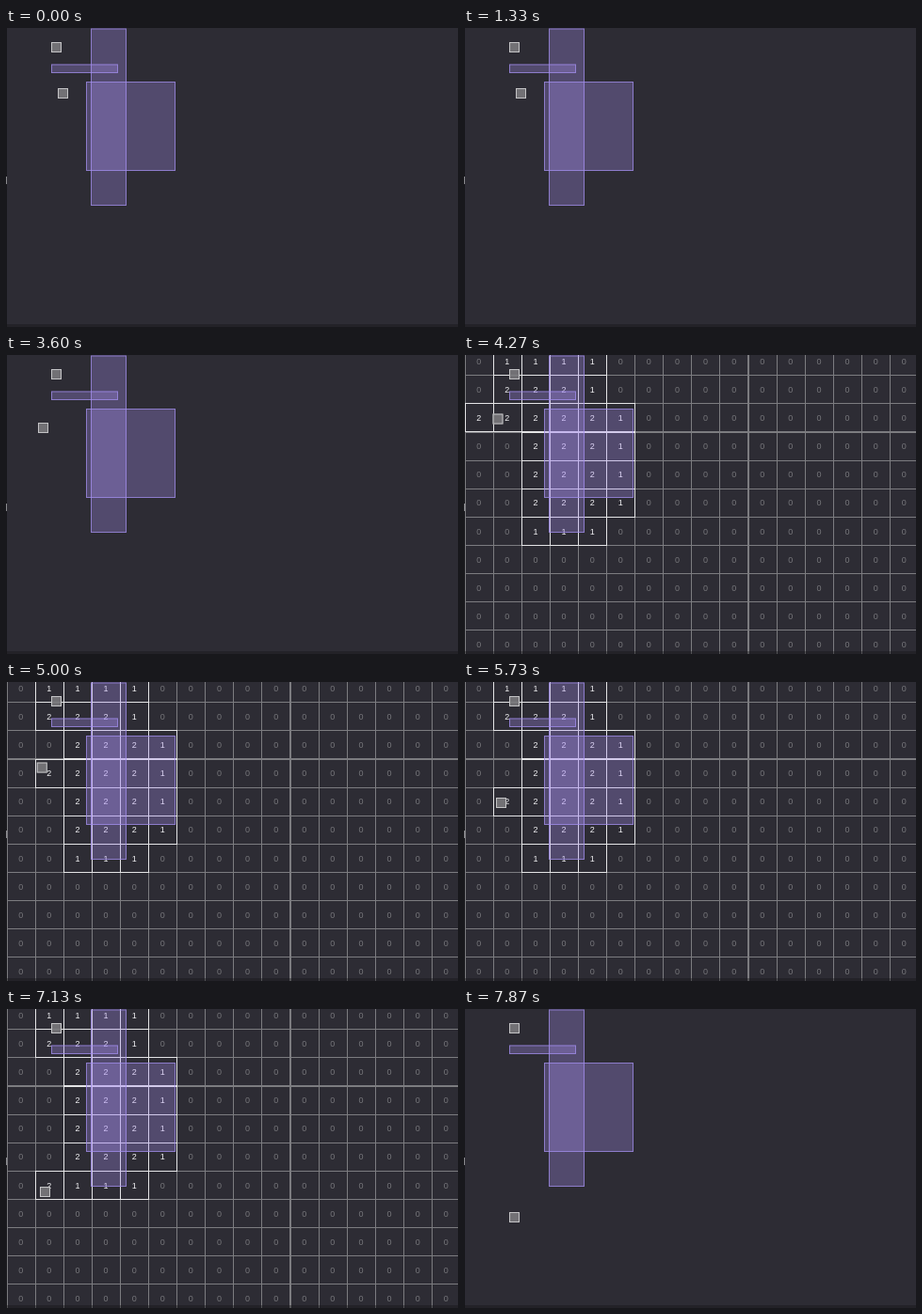
An HTML page with a canvas for the animation above (8000 ms loop, 480 by 318 pixels).

```html
<!DOCTYPE html>
<html lang="en">
<head>
<meta charset="utf-8">
<title>Spatial hash grid</title>
<style>
html, body { margin: 0; width: 100%; height: 100%; overflow: hidden; background: #2d2c34; }
canvas { display: block; }
</style>
</head>
<body>
<canvas id="stage" width="480" height="318"></canvas>
<script>
const ctx = document.getElementById('stage').getContext('2d');
const LOOP = 8000, GRID_ON = 3930, GRID_OFF = 7530;
const CELL = 30.1, LEFT = 1, TOP = -8.3, COLS = 16, ROWS = 11;

const PURPLE = { fill: 'rgba(168,144,240,.3)', stroke: 'rgba(160,140,235,.75)' };
const GRAY = { fill: 'rgba(120,120,123,.92)', stroke: '#c4c4c6' };
const shape = (x, y, w, h, style, weight = 1) => ({ x, y, w, h, style, weight });

const fixed = [
  shape(90, 0.5, 38, 188.5, PURPLE),
  shape(85, 57, 95, 95, PURPLE),
  shape(48, 38.5, 71, 9.5, PURPLE),
  shape(48, 15, 11, 11, GRAY)
];

// Drag path: time, left, top
const path = [
  [2840, 55, 64], [3330, 29.5, 70], [3600, 34, 72], [4270, 30.5, 62.5],
  [4600, 31.5, 67], [5400, 34, 104], [5730, 34, 123], [6050, 29.5, 120],
  [6350, 29, 108], [6700, 31.5, 140], [7130, 36, 189], [7200, 36, 189],
  [7800, 48, 216]
];

function dragged(t) {
  const next = path.findIndex(p => p[0] > t);
  if (next === 0) return path[0].slice(1);
  if (next < 0) return path[path.length - 1].slice(1);
  const a = path[next - 1], b = path[next];
  const k = (t - a[0]) / (b[0] - a[0]);
  return [a[1] + (b[1] - a[1]) * k, a[2] + (b[2] - a[2]) * k];
}

function drawShape({ x, y, w, h, style }) {
  ctx.fillStyle = style.fill;
  ctx.fillRect(x, y, w, h);
  ctx.strokeStyle = style.stroke;
  ctx.strokeRect(x + 0.5, y + 0.5, w - 1, h - 1);
}

function count(x, y, shapes) {
  return shapes.reduce((sum, s) => {
    const hit = s.x < x + CELL && s.x + s.w > x && s.y < y + CELL && s.y + s.h > y;
    return sum + (hit ? s.weight : 0);
  }, 0);
}

function drawGrid(shapes) {
  const cells = [];
  for (let r = 0; r < ROWS; r++) {
    for (let c = 0; c < COLS; c++) {
      const x = LEFT + c * CELL, y = TOP + r * CELL;
      cells.push({ x, y, n: count(x, y, shapes) });
    }
  }
  ctx.font = '9px "Liberation Sans", Arial, sans-serif';
  ctx.textAlign = 'center';
  ctx.textBaseline = 'alphabetic';
  for (const busy of [false, true]) {
    ctx.strokeStyle = busy ? '#e4e4e6' : '#7c7c80';
    ctx.fillStyle = busy ? '#f2f2f4' : '#77777b';
    for (const { x, y, n } of cells.filter(cell => (cell.n > 0) === busy)) {
      ctx.strokeRect(Math.floor(x) + 0.5, Math.floor(y) + 0.5, 30, 30);
      ctx.fillText(n, x + CELL / 2 - 0.3, y + CELL / 2 + 3.2);
    }
  }
}

function draw(now) {
  const t = now % LOOP;
  const [x, y] = dragged(t);
  const shapes = [...fixed, shape(x, y, 11, 11, GRAY, 2)];
  ctx.lineWidth = 1;
  ctx.fillStyle = '#2d2c34';
  ctx.fillRect(0, 0, 480, 318);
  if (t >= GRID_ON && t < GRID_OFF) drawGrid(shapes);
  shapes.forEach(drawShape);
  ctx.fillStyle = '#17171b';
  ctx.fillRect(0, 0, 1, 318);
  ctx.fillStyle = 'rgba(20,20,24,.4)';
  ctx.fillRect(0, 315, 480, 3);
  ctx.fillStyle = '#8a8a8e';
  ctx.fillRect(0, 158, 1, 8);
}

const start = performance.now();
function tick() {
  draw(performance.now() - start);
  requestAnimationFrame(tick);
}
tick();
</script>
</body>
</html>
```
